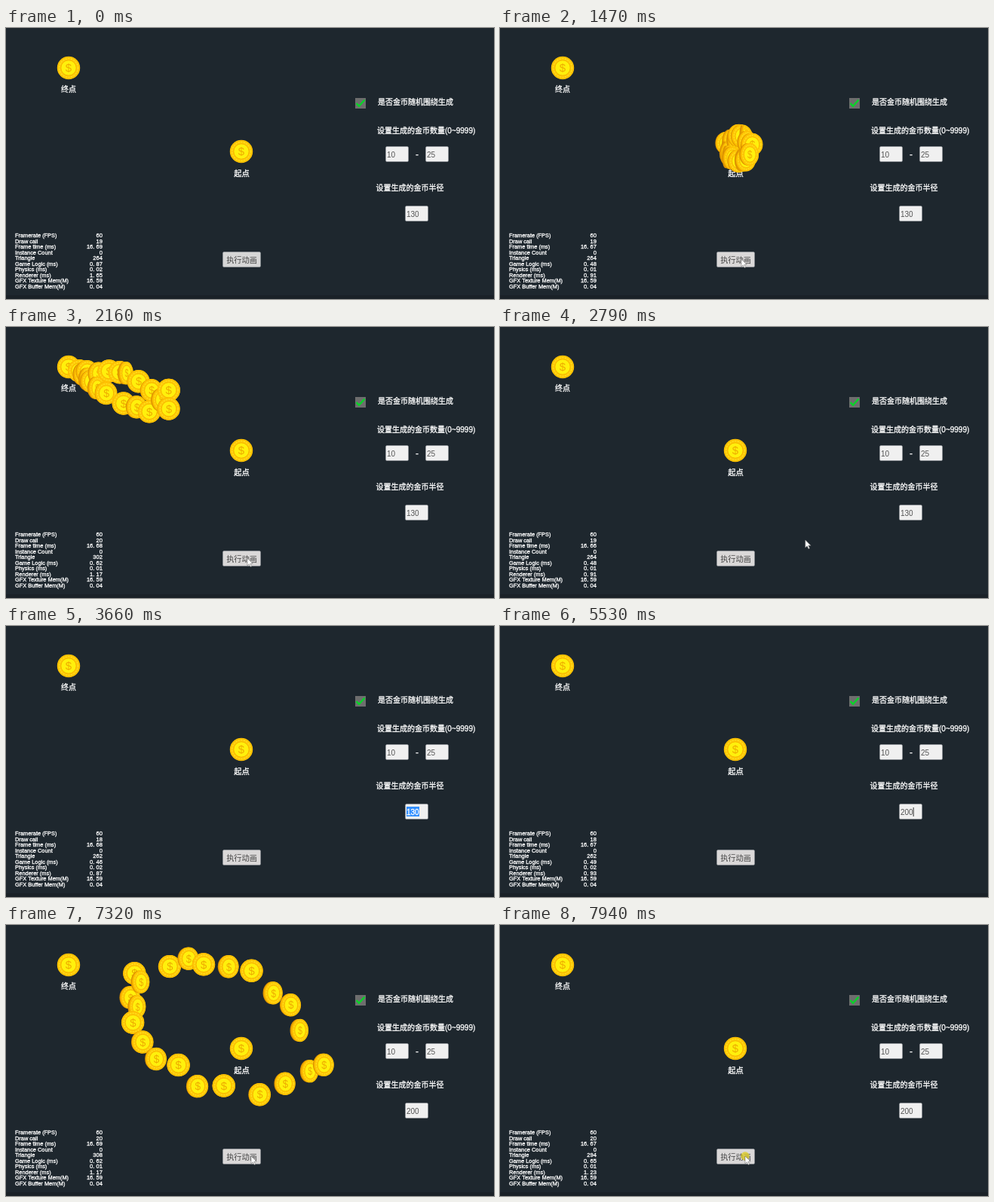
An HTML page with a canvas that plays this animation: 647x360 px, repeating every 8000 ms.

```html
<!DOCTYPE html>
<html lang="zh">
<head>
<meta charset="utf-8">
<title>金币动画</title>
<style>
html, body { margin: 0; width: 100%; height: 100%; overflow: hidden; background: #1e272e; }
canvas { display: block; width: 647px; height: 360px; }
</style>
</head>
<body>
<canvas id="stage" width="647" height="360"></canvas>
<script>
const ctx = document.getElementById('stage').getContext('2d');
const LOOP = 8000, FONT = '"Liberation Sans", "Noto Sans CJK SC", "Noto Sans CJK", sans-serif';
const BACK = '#1e272e', UNIT = 0.52;
const START = { x: 312, y: 164 }, END = { x: 83, y: 53 };
const SPREAD = 330, FIRST_LEAVE = 310, STAGGER = 10, FLIGHT = 500, HALF_TURN = 800;
const TICK = 508, FIRST_TICK = 34;

const clamp = v => Math.max(0, Math.min(1, v));
const mix = (a, b, k) => a + (b - a) * k;
const smooth = k => k * k * (3 - 2 * k);
const between = (t, from, to) => t >= from && t < to;
const fraction = v => v - Math.floor(v);
const random = seed => fraction(Math.sin(seed * 12.9898) * 43758.5453);

// Coins sit evenly on a circle, each nudged right and up; the nearest to the end leave first.
function makeBurst(begin, count, radius) {
  const coins = Array.from({ length: count }, (_, i) => {
    const angle = 2 * Math.PI * i / count, seed = begin + i * 3;
    const x = START.x + UNIT * (radius * Math.cos(angle) + 50 * random(seed));
    const y = START.y + UNIT * (radius * Math.sin(angle) - 50 * random(seed + 1));
    return { x, y, tilt: random(seed + 2) - 0.5 };
  });
  coins.sort((a, b) => Math.hypot(a.x - END.x, a.y - END.y) - Math.hypot(b.x - END.x, b.y - END.y));
  return { begin, coins };
}
const BURSTS = [makeBurst(1390, 19, 130), makeBurst(6780, 22, 200)];

function flyingCoins(t) {
  return BURSTS.filter(b => t >= b.begin).flatMap(({ begin, coins }) => {
    const age = t - begin, out = clamp(age / SPREAD);
    return coins.map(({ x, y, tilt }, i) => {
      const flown = clamp((age - FIRST_LEAVE - STAGGER * i) / FLIGHT);
      return {
        flown,
        x: mix(mix(START.x, x, out), END.x, flown),
        y: mix(mix(START.y, y, out), END.y, flown),
        angle: tilt + Math.PI * (age - 650) / HALF_TURN
      };
    }).filter(c => c.flown < 1);
  });
}

function text(str, x, y, size = 10, color = '#fff', align = 'left') {
  ctx.font = `${size}px ${FONT}`;
  ctx.textAlign = align;
  ctx.fillStyle = ctx.strokeStyle = color;
  ctx.fillText(str, x, y);
  if (color === '#fff') {
    ctx.lineWidth = 0.3;
    ctx.strokeText(str, x, y);
  }
}

function box(x, y, w, h, color) {
  ctx.beginPath();
  ctx.roundRect(x + 0.5, y + 0.5, w - 1, h - 1, 1.5);
  ctx.fillStyle = color;
  ctx.fill();
  ctx.lineWidth = 1;
  ctx.strokeStyle = 'rgba(150, 155, 160, .55)';
  ctx.stroke();
}

function disc(r, fill, x = 0) {
  ctx.beginPath();
  ctx.arc(x, 0, r, 0, 7);
  ctx.fillStyle = fill;
  ctx.fill();
}

function ring(r, color, width = 1, dash = []) {
  ctx.beginPath();
  ctx.arc(0, 0, r, 0, 7);
  ctx.setLineDash(dash);
  ctx.lineWidth = width;
  ctx.strokeStyle = color;
  ctx.stroke();
  ctx.setLineDash([]);
}

function coin({ x, y, angle = 0 }) {
  const width = Math.max(0.12, Math.abs(Math.cos(angle)));
  const rim = 4 * Math.abs(Math.sin(angle));
  ctx.save();
  ctx.translate(x + rim / 2, y);
  ctx.scale(width, 1);
  if (rim > 0) {
    disc(15, '#dc9200', -rim / width);
    disc(15, '#f0aa00', -rim / 2 / width);
  }
  disc(15.2, '#ffca08');
  ring(14.4, '#ffbc00');
  ring(12.4, '#ffe024', 1.4, [1.6, 2]);
  disc(10.2, '#fff00c');
  ring(10.2, '#f6b400');
  text('$', 0, 5.2, 15, '#eeac00', 'center');
  ctx.restore();
}

function stats(t) {
  const tick = Math.floor((t - FIRST_TICK) / TICK) + 1;
  const sampled = FIRST_TICK + TICK * (tick - 1);
  const count = flyingCoins(sampled).length;
  const editing = between(sampled, 3360, 6700);
  const logic = 0.44 + 0.43 * Math.exp(-1.5 * tick) + (count ? 0.15 : 0) + (tick ? 0.06 * random(tick) : 0);
  const round = v => String(+v.toFixed(2)).replace('.', '. ');
  const rows = {
    'Framerate (FPS)': 60,
    'Draw call': count ? 20 : editing ? 18 : 19,
    'Frame time (ms)': 16.66 + 0.03 * random(tick + 1),
    'Instance Count': 0,
    'Triangle': editing ? 262 : 264 + 2 * count,
    'Game Logic (ms)': logic,
    'Physics (ms)': logic > 0.8 || editing ? 0.02 : 0.01,
    'Renderer (ms)': 1.9 * logic,
    'GFX Texture Mem(M)': 16.59,
    'GFX Buffer Mem(M)': 0.04
  };
  Object.entries(rows).forEach(([name, value], i) => {
    const y = 278.2 + i * 7.53;
    text(name, 12, y, 7.4);
    text(round(value), 128, y, 7.6, '#fff', 'right');
  });
}

function field(x, y, value) {
  box(x, y, 31, 21, '#f0f0f0');
  text(value, x + 2, y + 14.5, 10, '#555');
}

function radiusField(t) {
  const value = t < 4650 ? '130' : '200'.slice(0, t < 5110 ? 1 : t < 5530 ? 2 : 3);
  field(529, 236, value);
  if (between(t, 3360, 4650)) {
    const w = 17 * clamp((t - 3360) / 300);
    ctx.save();
    ctx.beginPath();
    ctx.rect(548 - w, 240, w, 13);
    ctx.clip();
    ctx.fillStyle = '#3390ff';
    ctx.fillRect(530, 240, 18, 13);
    text(value, 531, 250.5);
    ctx.restore();
  } else if (between(t, 4650, 6700)) {
    ctx.fillStyle = '#333';
    ctx.fillRect(531 + value.length * 5.56, 241, 1, 12);
  }
}

function panel(t) {
  ctx.fillStyle = '#6e6e6e';
  ctx.fillRect(463, 93, 14, 14);
  ctx.strokeStyle = '#08d428';
  ctx.lineWidth = 2.4;
  ctx.stroke(new Path2D('M464.5 100L468 103.8L475.5 95.5'));
  text('是否金币随机围绕生成', 493, 102);
  text('设置生成的金币数量(0~9999)', 492, 140.3);
  field(503, 157, '10');
  text('-', 545, 171.5, 12, '#fff', 'center');
  field(556, 157, '25');
  text('设置生成的金币半径', 490.5, 216.3);
  radiusField(t);
  box(287, 297, 51, 21, t < 700 ? '#d6d6d6' : '#dad8d8');
  text('执行动画', 312.5, 311.6, 10.2, '#444', 'center');
}

const BUTTON = { x: 320, y: 307 }, INPUT = { x: 536, y: 246 };
const MOVES = [
  { from: 310, to: 770, a: { x: 424, y: 340 }, b: BUTTON },
  { from: 2500, to: 3180, a: BUTTON, b: INPUT },
  { from: 5680, to: 6300, a: INPUT, b: { x: 325, y: 307 } }
];
const CLICKS = [1310, 6690, 7940];

function cursor(t) {
  const move = MOVES.filter(m => m.from <= t).pop();
  if (!move || between(t, 3200, 5680)) return;
  const k = smooth(clamp((t - move.from) / (move.to - move.from)));
  ctx.save();
  ctx.translate(mix(move.a.x, move.b.x, k), mix(move.a.y, move.b.y, k));
  if (CLICKS.some(c => between(t, c, c + 80))) disc(5.7, 'rgba(222, 204, 30, .75)');
  const arrow = new Path2D('M0 0V10L2.4 7.9L4.2 11.6L5.7 10.9L4 7.3H7.2Z');
  ctx.fillStyle = '#fff';
  ctx.fill(arrow);
  ctx.strokeStyle = '#777';
  ctx.lineWidth = 0.6;
  ctx.stroke(arrow);
  ctx.restore();
}

function draw(t) {
  ctx.fillStyle = BACK;
  ctx.fillRect(0, 0, 647, 360);
  ctx.fillStyle = '#1a2127';
  ctx.fillRect(0, 355, 647, 5);
  coin(END);
  text('终点', 83, 84.6, 10, '#fff', 'center');
  coin(START);
  text('起点', 312.5, 196.8, 10.3, '#fff', 'center');
  panel(t);
  flyingCoins(t).forEach(coin);
  stats(t);
  cursor(t);
}

const begin = performance.now();
function frame() {
  draw((performance.now() - begin) % LOOP);
  requestAnimationFrame(frame);
}
frame();
</script>
</body>
</html>
```
